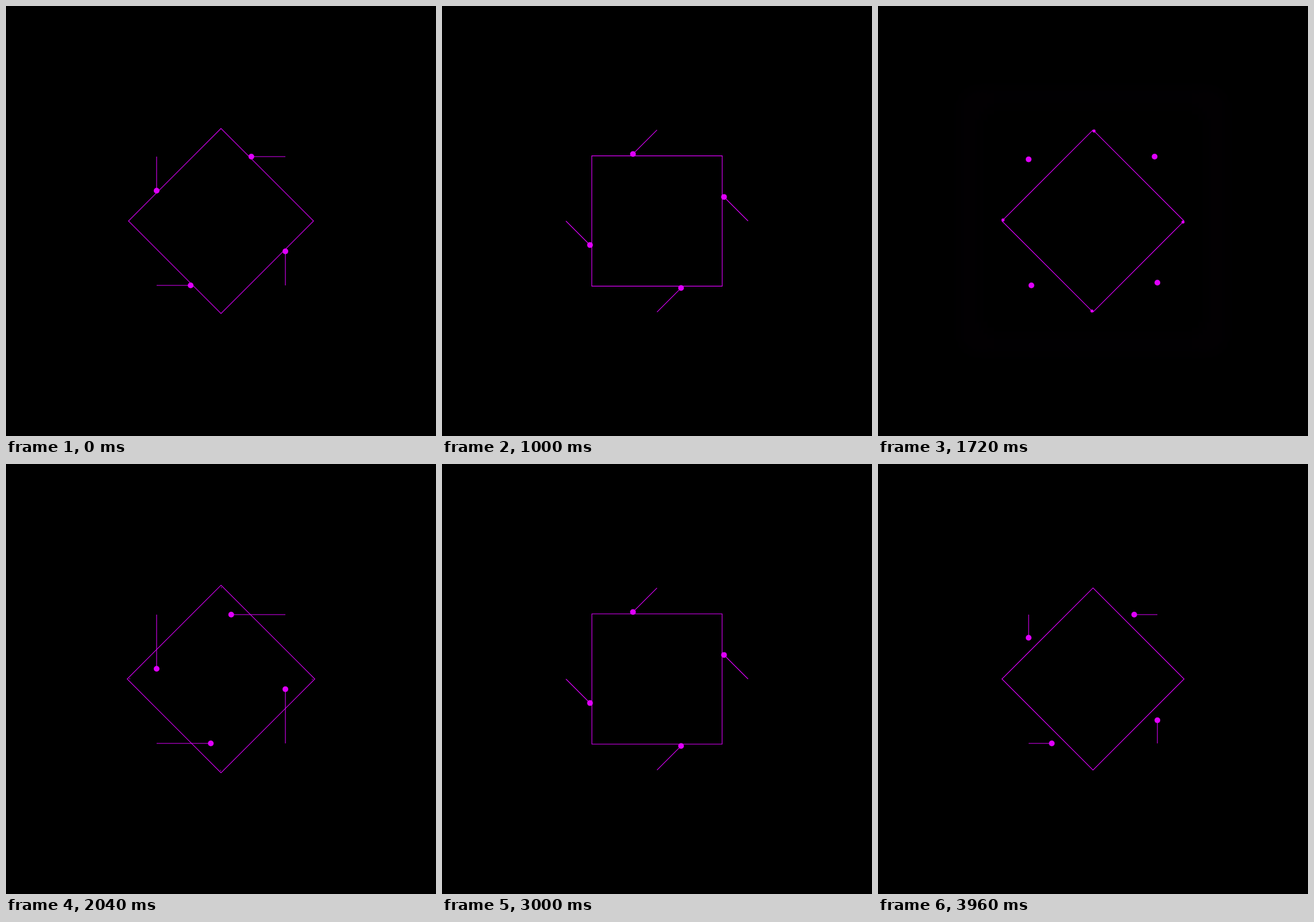
An HTML page for the animation above (4 s loop, 748x748 px).

```html
<!DOCTYPE html>
<html lang="en">
<head>
<meta charset="utf-8">
<title>Tracing squares</title>
<style>
  html, body { margin: 0; width: 100%; height: 100%; overflow: hidden; background: #000; }
  svg { display: block; width: 100vw; height: 100vh; }
  path { fill: none; stroke: #e000ff; stroke-width: 1.1; }
  circle { fill: #e000ff; }
</style>
</head>
<body>
<svg viewBox="0 0 748 748"></svg>
<script>
const NS = 'http://www.w3.org/2000/svg';
const svg = document.querySelector('svg');
const LOOP = 4000, CYCLE = 2000, STEP = 40;
const TRAVEL = 1500, LEAD = 525, BURST = 960;
const MID = 374, RADIUS = 112 * Math.SQRT2, SIDE = 224;

const mod = (a, n) => ((a % n) + n) % n;
const clamp = x => Math.min(1, Math.max(0, x));
const add = tag => svg.appendChild(document.createElementNS(NS, tag));

// cubic-bezier(.7, 0, 0, 1)
function ease(x) {
  if (x <= 0) return 0;
  if (x >= 1) return 1;
  let lo = 0, hi = 1;
  for (let i = 0; i < 30; i++) {
    const s = (lo + hi) / 2;
    if (2.1 * s * (1 - s) ** 2 + s ** 3 < x) lo = s; else hi = s;
  }
  return lo * lo * (3 - 2 * lo);
}

// Corners run anticlockwise on screen.
const corners = (turn, r) => [0, 1, 2, 3].map(i => {
  const a = (turn + i * 90) * Math.PI / 180;
  return [MID + r * Math.cos(a), MID - r * Math.sin(a)];
});
const fmt = p => p.map(n => n.toFixed(2)).join(' ');

// Each burst is [spread, power].
const shapes = [
  { turn: 45, offset: 0, bursts: [[0.59, 1.46], [0.52, 1.46]] },
  { turn: 90, offset: 1000, bursts: [[0.52, 1.46], [0.433, 1.24]] }
];
for (const s of shapes) s.glow = add('path');
for (const s of shapes) s.lines = add('path');
for (const s of shapes) s.dots = [0, 1, 2, 3].map(() => add('circle'));

function dotRadius(v) {
  if (v < 1000) return 5 * (1 - (v / 1000) ** 2.3);
  return 5 * (1 - (1 - clamp((v - 1000) / 475)) ** 2);
}

function drawGlow(s, t) {
  const since = mod(t - s.offset - BURST, LOOP);
  const [spread, power] = s.bursts[Math.floor(since / CYCLE)];
  const e = since % CYCLE;
  const grow = spread * (e / 560) ** power;
  const alpha = 1 - clamp((e - 560) / 340);
  s.glow.setAttribute('opacity', alpha);
  if (!alpha) return;
  const pts = corners(s.turn, RADIUS * (1 + grow));
  s.glow.setAttribute('d', 'M' + pts.map(fmt).join('L') + 'Z');
  s.glow.style.filter = grow > 0 ? `blur(${(22 * grow).toFixed(2)}px)` : 'none';
}

function drawTrace(s, t) {
  const u = mod(t - s.offset + LEAD, CYCLE);
  const p = u < TRAVEL ? ease(u / TRAVEL) : 0;
  const r = dotRadius(mod(t - s.offset, CYCLE));
  const pts = corners(s.turn, RADIUS);
  const tail = -0.8 / SIDE;
  const k = tail + (1 - tail) * p;
  let d = '';
  pts.forEach((a, i) => {
    const b = pts[(i + 1) % 4];
    const at = f => [a[0] + (b[0] - a[0]) * f, a[1] + (b[1] - a[1]) * f];
    d += `M${fmt(a)}L${fmt(at(p))}`;
    const [x, y] = at(k);
    const dot = s.dots[i];
    dot.setAttribute('cx', x);
    dot.setAttribute('cy', y);
    dot.setAttribute('r', r);
  });
  s.lines.setAttribute('d', p > 0 && u < BURST + LEAD ? d : '');
}

function draw(t) {
  for (const s of shapes) {
    drawGlow(s, t);
    drawTrace(s, t);
  }
}

const start = performance.now();
function tick() {
  const t = mod(performance.now() - start, LOOP);
  draw(Math.floor(t / STEP) * STEP);
  requestAnimationFrame(tick);
}
tick();
</script>
</body>
</html>
```
